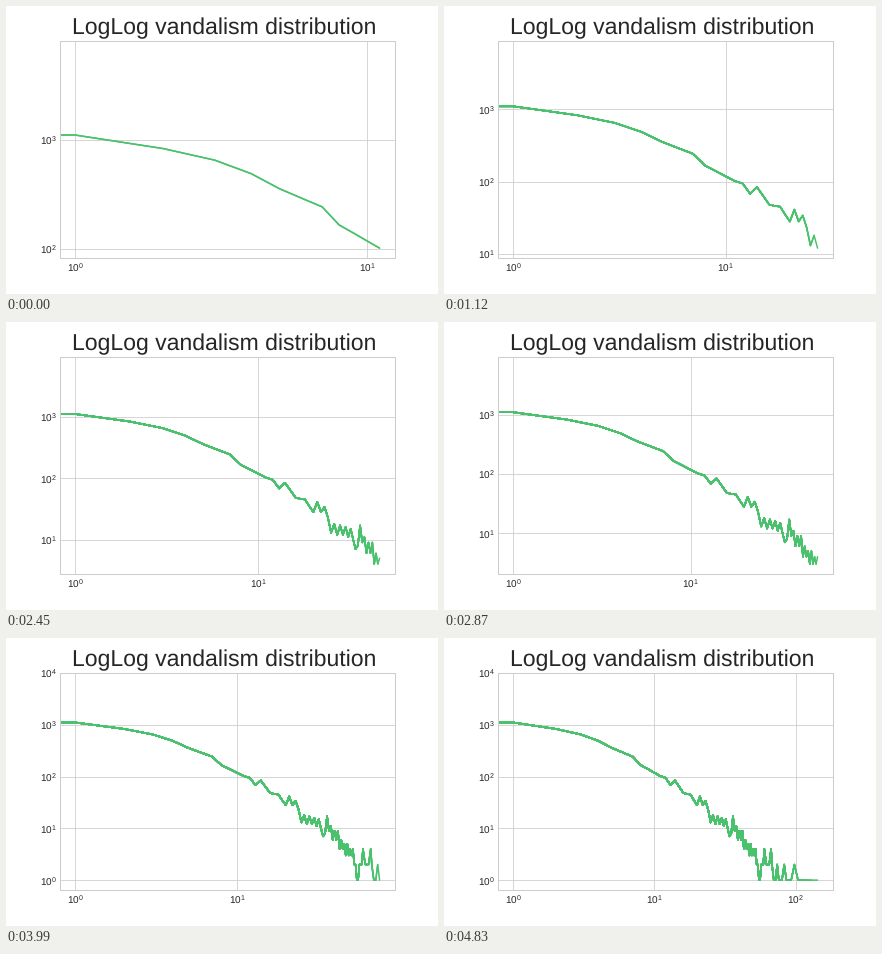
Recreate the animation shown at these times as a matplotlib script. Size 432 by 288 pixels, loop 5.6 s.

```python
import matplotlib.pyplot as plt
import numpy as np
from matplotlib.animation import FuncAnimation
from matplotlib.ticker import NullFormatter

W, H, DPI = 432, 288, 72
FRAMES, INTERVAL = 80, 70
START = 12          # points on show at first
DENSE = 56          # every count up to here occurs
SPARSE = 24         # further counts, ever wider apart
RIPPLE = 1.2        # even counts above the trend, odd ones below
MARGIN = 0.05       # share of the log range added on each side
GREEN = "#4ac16d"

# Turning points of the trend, joined by straight lines in log-log space
TREND = [(1, 1102), (2, 829), (3, 650), (4, 489), (5, 356), (7, 243),
         (8, 166), (11, 102), (12, 94), (13, 68), (14, 84), (16, 48),
         (18, 45), (20, 28), (21, 41), (22, 28), (23, 34), (25, 15.9),
         (33, 12.3), (34, 5.9), (36, 14.2), (39, 7.2), (42, 7.5),
         (43, 4.9), (52, 3.4), (56, 1)]


def make_data():
    """Vandalism counts and the number of users with each count."""
    dense = np.arange(1, DENSE + 1)
    key_x, key_y = np.log(TREND).T
    trend = np.exp(np.interp(np.log(dense), key_x, key_y))
    ripple = np.where(dense % 2, 1 / RIPPLE, RIPPLE)
    body = np.rint(trend * np.where(dense > 24, ripple, 1))

    j = np.arange(1, SPARSE + 1)
    sparse = np.floor(DENSE + 1.61 * j + 49 * (j / SPARSE) ** 6)
    spikes = (j % 4 == 3) & (j < 20)
    tail = np.where(spikes, 2, 1) * np.where(j < 9, 2, 1)

    return np.r_[0, dense, sparse], np.r_[6540, body, tail]


def padded(lo, hi):
    pad = (hi / lo) ** MARGIN
    return lo / pad, hi * pad


plt.style.use("seaborn-v0_8-whitegrid")
plt.rcParams.update({
    "font.family": "Liberation Sans",
    "font.size": 10,
    "xtick.labelsize": 10,
    "ytick.labelsize": 10,
    "text.hinting": "none",
})

counts, users = make_data()
total = len(counts)

fig = plt.figure(figsize=(W / DPI, H / DPI), dpi=DPI, facecolor="white")
ax = fig.add_axes([0.125, 0.125, 0.775, 0.755])
ax.set_xscale("log")
ax.set_yscale("log")
for axis in (ax.xaxis, ax.yaxis):
    axis.set_minor_formatter(NullFormatter())
fig.text(218 / W, 1 - 28.56 / H, "LogLog vandalism distribution",
         fontsize=23, ha="center", va="baseline")

# Each step lays a longer line over the earlier ones; the first is laid twice.
sizes = [START, *range(START, total + 1)]
lines = [ax.plot(counts[:n], users[:n], color=GREEN, lw=1.5)[0]
         for n in sizes]


def update(frame):
    shown = min(START + frame, total)
    for n, line in zip(sizes, lines):
        line.set_visible(n <= shown)
    ax.set_xlim(padded(1, counts[shown - 1]))
    ax.set_ylim(padded(users[:shown].min(), users[0]))
    return lines


anim = FuncAnimation(fig, update, frames=FRAMES, interval=INTERVAL,
                     repeat=True, repeat_delay=0, blit=False)
plt.show()
```
